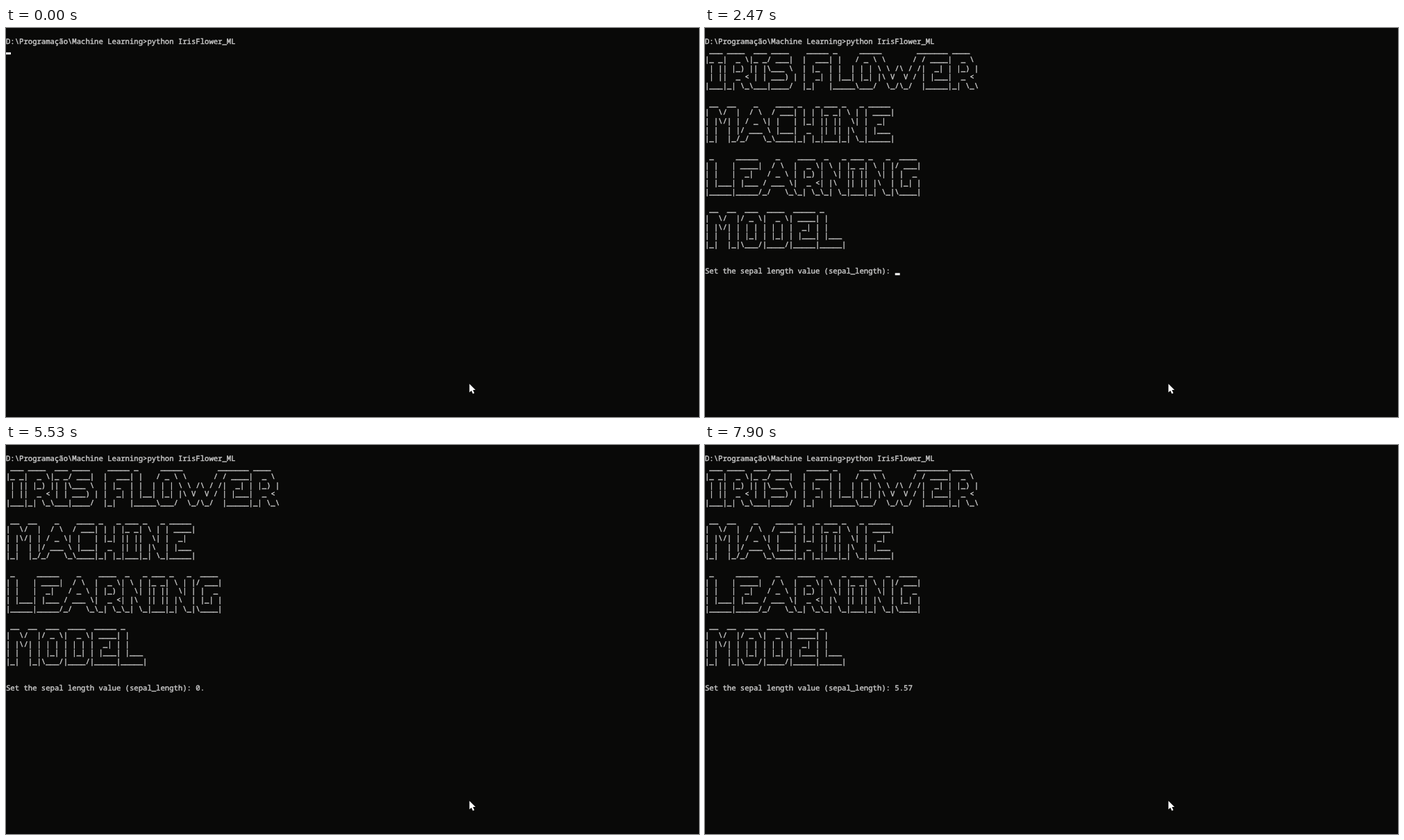
Write an HTML page with a canvas that moves like this. It is 998 px wide and 561 px high and loops after 8 s.

```html
<!DOCTYPE html>
<html lang="en">
<head>
<meta charset="utf-8">
<title>Terminal</title>
<style>
  html, body { margin: 0; width: 100%; height: 100%; overflow: hidden; background: #090908; }
  canvas { display: block; }
</style>
</head>
<body>
<canvas id="screen" width="998" height="561"></canvas>
<script>
  const LOOP = 8000, BLINK = 530, PRINTED = 1950;
  const CELL_W = 6.365, CELL_H = 12.73, BASELINE = 23.4;
  const command = String.raw`D:\Programação\Machine Learning>python IrisFlower_ML`;
  const prompt = "Set the sepal length value (sepal_length): ";
  const banner = String.raw`
 ___ ____  ___ ____    _____ _     _____        _______ ____
|_ _|  _ \|_ _/ ___|  |  ___| |   / _ \ \      / / ____|  _ \
 | || |_) || |\___ \  | |_  | |  | | | \ \ /\ / /|  _| | |_) |
 | ||  _ < | | ___) | |  _| | |__| |_| |\ V  V / | |___|  _ <
|___|_| \_\___|____/  |_|   |_____\___/  \_/\_/  |_____|_| \_\

 __  __    _    ____ _   _ ___ _   _ _____
|  \/  |  / \  / ___| | | |_ _| \ | | ____|
| |\/| | / _ \| |   | |_| || ||  \| |  _|
| |  | |/ ___ \ |___|  _  || || |\  | |___
|_|  |_/_/   \_\____|_| |_|___|_| \_|_____|

 _     _____    _    ____  _   _ ___ _   _  ____
| |   | ____|  / \  |  _ \| \ | |_ _| \ | |/ ___|
| |   |  _|   / _ \ | |_) |  \| || ||  \| | |  _
| |___| |___ / ___ \|  _ <| |\  || || |\  | |_| |
|_____|_____/_/   \_\_| \_\_| \_|___|_| \_|\____|

 __  __  ___  ____  _____ _
|  \/  |/ _ \|  _ \| ____| |
| |\/| | | | | | | |  _| | |
| |  | | |_| | |_| | |___| |___
|_|  |_|\___/|____/|_____|_____|

`.split("\n").slice(1);

  const caretOn = [-390, 670, 1730, 2260, 3320, 4910, 5970, 7030];
  const typing = [
    [0, ""], [3880, "0"], [4120, "0."], [4380, "0.5"],
    [5450, "0."], [5620, "0"], [5790, ""],
    [6150, "5"], [6700, "5."], [7080, "5.5"], [7400, "5.57"]
  ];
  const pointer = new Path2D("M667.4 513.3v12.2l2.8-2.6 2.1 4.6 2.2-1-2.1-4.4h3.7z");

  const ctx = document.getElementById("screen").getContext("2d");
  ctx.font = '10.608px "Noto Sans Mono", "DejaVu Sans Mono", monospace';
  ctx.textRendering = "geometricPrecision";
  ctx.lineWidth = 0.4;
  ctx.lineJoin = "round";

  function print(line, row) {
    const y = Math.round(BASELINE + row * CELL_H);
    ctx.fillText(line, 0, y);
    ctx.strokeText(line, 0, y);
  }

  function draw(now) {
    const t = now % LOOP, printed = t >= PRINTED;
    const input = prompt + typing.findLast(([start]) => t >= start)[1];
    const lines = printed ? [command, ...banner, input] : [command, ""];
    // The caret stays hidden after printing until the next blink.
    const lit = caretOn.some(start => t >= start && t < start + BLINK && printed === start >= PRINTED);

    ctx.fillStyle = "#090908";
    ctx.fillRect(0, 0, 998, 561);
    ctx.fillStyle = ctx.strokeStyle = "#ccc";
    lines.forEach(print);

    ctx.fillStyle = "#fff";
    if (lit) ctx.fillRect(lines.at(-1).length * CELL_W, (lines.length + 1) * CELL_H - 3, 7, 3);
    ctx.fill(pointer);
    requestAnimationFrame(draw);
  }
  requestAnimationFrame(draw);
</script>
</body>
</html>
```
